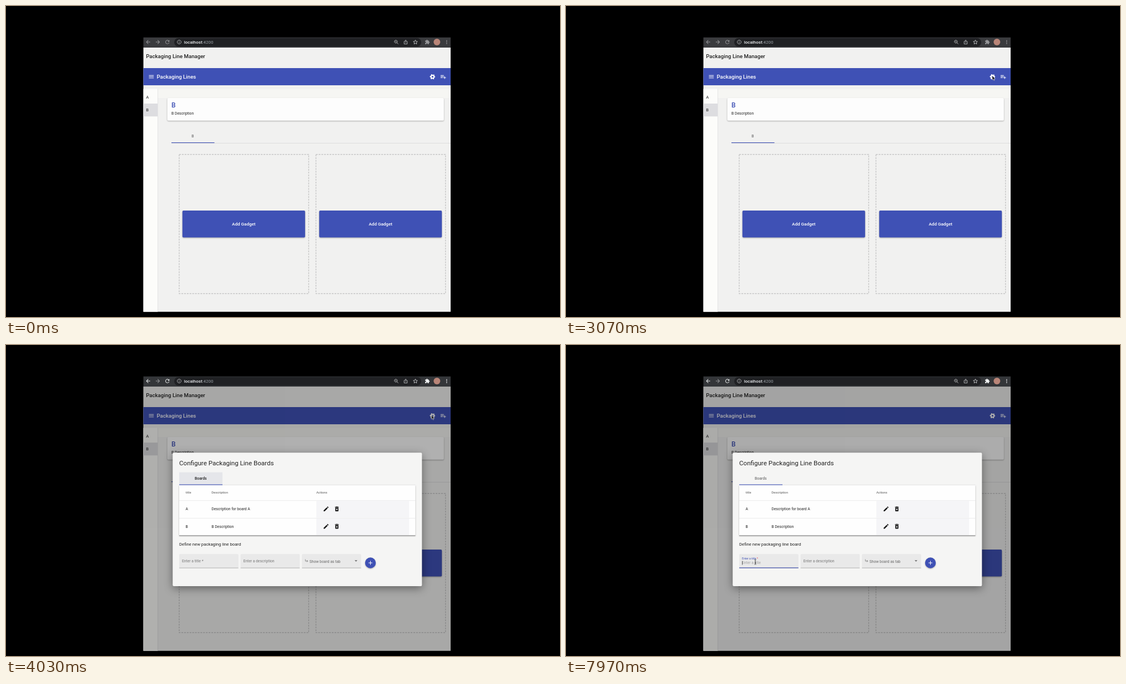
Write an HTML page that moves like this. It is 998 by 561 pixels and loops after 8000 ms.

```html
<!DOCTYPE html>
<html lang="en">
<head>
<meta charset="utf-8">
<title>Packaging Line Manager</title>
<style>
  html, body { margin: 0; width: 100%; height: 100%; overflow: hidden; background: #000; }
  svg { display: block; width: 100vw; height: 100vh; }
  text { font-family: Roboto, sans-serif; white-space: pre; }
  #dialog { transform-origin: 524.8px 314.5px; }
  #fieldLine { transform-origin: 365.5px 402px; }
  #ripple { transform-origin: 768px 127.7px; }
  .shadow { filter: drop-shadow(0 1px .8px rgba(0, 0, 0, .3)); }
  .deep { filter: drop-shadow(0 4px 8px rgba(0, 0, 0, .42)); }
</style>
</head>
<body>
<svg id="stage" viewBox="0 0 998 561" preserveAspectRatio="none"></svg>
<script>
const LOOP = 8000;
const BLUE = '#3f51b5', INK = '#222';

const rect = (x, y, w, h, fill, extra = '') =>
  `<rect x="${x}" y="${y}" width="${w}" height="${h}" fill="${fill}" ${extra}/>`;
const text = (str, x, y, size, fill = INK, weight = 400, extra = '') =>
  `<text x="${x}" y="${y}" font-size="${size}" fill="${fill}" font-weight="${weight}" ${extra}>${str}</text>`;
const at = (cx, cy, size, body, extra = '') =>
  `<g transform="translate(${cx} ${cy}) scale(${size / 24}) translate(-12 -12)" ${extra}>${body}</g>`;
const icon = (name, cx, cy, size, fill, extra = '') =>
  at(cx, cy, size, `<path fill-rule="evenodd" d="${PATHS[name]}"/>`, `fill="${fill}" ${extra}`);
const outline = (d, cx, cy, size, stroke) =>
  at(cx, cy, size, `<path d="${d}"/>`, `fill="none" stroke="${stroke}" stroke-width="2.2"`);

const PATHS = {
  back: 'M20 11H7.8l5.6-5.6L12 4l-8 8 8 8 1.4-1.4L7.8 13H20z',
  forward: 'M4 11h12.2l-5.6-5.6L12 4l8 8-8 8-1.4-1.4 5.6-5.6H4z',
  reload: 'M17.65 6.35A8 8 0 1 0 19.73 14h-2.08A6 6 0 1 1 12 6c1.66 0 3.14.69 4.22 1.78L13 11h7V4z',
  puzzle: 'M20.5 11H19V7c0-1.1-.9-2-2-2h-4V3.5a2.5 2.5 0 0 0-5 0V5H4c-1.1 0-2 .9-2 2v3.8h1.5a2.7 2.7 0 0 1 0 5.4H2V20c0 1.1.9 2 2 2h3.8v-1.5a2.7 2.7 0 0 1 5.4 0V22H17c1.1 0 2-.9 2-2v-4h1.5a2.5 2.5 0 0 0 0-5z',
  dots: 'M10 3h4v4h-4zM10 10h4v4h-4zM10 17h4v4h-4z',
  menu: 'M3 18h18v-2H3zM3 13h18v-2H3zM3 6v2h18V6z',
  addList: 'M14 10H2v2h12zM14 6H2v2h12zM18 14v-4h-2v4h-4v2h4v4h2v-4h4v-2zM2 16h8v-2H2z',
  edit: 'M3 17.25V21h3.75L17.81 9.94l-3.75-3.75zM20.71 7.04a1 1 0 0 0 0-1.41l-2.34-2.34a1 1 0 0 0-1.41 0l-1.83 1.83 3.75 3.75z',
  trash: 'M6 19c0 1.1.9 2 2 2h8c1.1 0 2-.9 2-2V7H6zM8.46 11.88l1.41-1.41L12 12.59l2.12-2.12 1.41 1.41L13.41 14l2.12 2.12-1.41 1.41L12 15.41l-2.12 2.12-1.41-1.41L10.59 14zM15.5 4l-1-1h-5l-1 1H5v2h14V4z',
  plus: 'M19 13h-6v6h-2v-6H5v-2h6V5h2v6h6z'
};

const browserBar = () => `
  ${rect(247.5, 56.7, 553.5, 18.5, '#3a3b3e', 'id="bar"')}
  ${rect(303, 57.8, 445, 15.4, '#202124', 'rx="7.7"')}
  <g id="navIcons" fill="#97989b">
    ${['back', 'reload', 'puzzle', 'dots'].map((name, i) =>
      icon(name, [256, 290.7, 759, 793.8][i], 65, [11, 11, 9.5, 9][i], 'inherit')).join('')}
  </g>
  ${icon('forward', 273.5, 65, 11, '#97989b')}
  ${outline('M12 2a10 10 0 1 0 .01 0M12 10.5v7M12 6v2.4', 312, 65, 8.4, '#c9cacd')}
  ${text('localhost<tspan fill="#9aa0a6" font-weight="400">:4200</tspan>', 320.7, 67.8, 8, '#e8eaed', 500)}
  ${outline('M10 3a7 7 0 1 0 .01 0M15 15l7 7M7 10h6', 703, 65, 8.8, '#d5d6d8')}
  ${outline('M8 9H4v13h16V9h-4M12 16V2M7.5 6.5L12 2l4.5 4.5', 720, 65, 8.4, '#d5d6d8')}
  ${outline('M12 2.5l2.9 6.5 7 .7-5.300 4.700 1.600 7L12 17.700 5.800 21.400l1.600-7L2.100 9.700l7-.7z', 737.5, 65, 9.200, '#d5d6d8')}
  <circle cx="776.3" cy="65" r="6" fill="#b98578"/>`;

const gear = () => at(768.3, 127.7, 11.6, `
  <circle cx="12" cy="12" r="5.4" stroke-width="4.200"/>
  <circle cx="12" cy="12" r="8.200" stroke-width="3.400" stroke-dasharray="4.400 4.187"
    transform="rotate(-15 12 12)"/>`, 'fill="none" stroke="#fff"');

const gadget = x => `
  ${rect(x, 267.7, 233.3, 251, 'none', 'stroke="#c6c6c6" stroke-width="1.4" stroke-dasharray="3.100 1.800"')}
  ${rect(x + 5.8, 369, 221, 48.4, BLUE, 'rx="2" class="shadow"')}
  ${text('Add Gadget', x + 116.3, 395.8, 8.05, '#fff', 500, 'text-anchor="middle"')}`;

const page = () => `
  ${rect(247.5, 75, 553.5, 476.6, '#f1f1f0')}
  ${text('Packaging Line Manager', 252.2, 93.5, 9.65, INK, 500)}
  ${rect(247.5, 112, 553.5, 31, BLUE)}
  ${icon('menu', 261.8, 127.7, 11.6, '#fff')}
  ${text('Packaging Lines', 271.400, 130.9, 9.65, '#fff', 500)}
  <circle id="ripple" cx="768" cy="127.700" r="9.500" fill="#fff" opacity="0"/>
  ${gear()}
  ${icon('addList', 787.7, 127.7, 11.6, '#fff')}
  ${rect(273, 150, 528, 16, '#f6f6f3')}
  ${rect(247.5, 149.5, 25.5, 402.1, '#fcfcfa')}
  ${rect(273, 149.5, .6, 402.1, '#dcdcdc')}
  ${rect(247.5, 176, 25.5, 23.2, '#dddde0')}
  ${text('A', 252.2, 166.7, 7.72)}
  ${text('B', 252.2, 189.9, 7.72)}
  ${rect(290.6, 166, 498.2, 40.700, '#fdfdfd', 'rx="2" class="shadow"')}
  ${text('B', 298, 182.5, 12, BLUE, 500)}
  ${text('B Description', 298.1, 195.9, 6.76)}
  ${text('B', 336.3, 237.3, 6.76, '#777', 500, 'text-anchor="middle"')}
  ${rect(298, 247, 503, .7, '#d4d4d4')}
  ${rect(298, 246, 77.5, 1.1, BLUE)}
  ${gadget(312)}
  ${gadget(558.4)}`;

const tableRow = (title, about, y) => `
  ${rect(312, y - 15.2, 425.5, .6, '#dfdfdf')}
  ${rect(559, y - 14.500, 167, 30.500, '#f5f5f7')}
  ${text(title, 323.6, y + 2.3, 6.76)}
  ${text(about, 370.3, y + 2.3, 6.76)}
  ${icon('edit', 576.6, y, 11.6, '#161616')}
  ${icon('trash', 596, y, 11.6, '#161616')}`;

const field = x => rect(x, 377, 106.7, 25.2, '#e9e9e9', 'rx="2"') + rect(x, 401.8, 106.7, .6, '#8a8a8a');

const dialog = () => `<g id="dialog" opacity="0">
  ${rect(300.3, 194.2, 449, 240.8, '#f5f5f4', 'rx="2" class="deep"')}
  ${text('Configure Packaging Line Boards', 312, 217.4, 11.58)}
  ${rect(312, 229.6, 78, 23, '#e5e6ea', 'id="tabFocus" opacity="0"')}
  ${text('Boards', 350.8, 242.7, 6.76, '#777', 500, 'id="tabName" text-anchor="middle"')}
  ${rect(312, 252.900, 425.5, 90.6, '#fefefe', 'class="shadow"')}
  ${rect(312, 252.200, 425.5, .6, '#dcdcdc')}
  ${rect(312, 251.5, 78, 1.1, BLUE)}
  ${['title', 'Description', 'Actions'].map((name, i) =>
    text(name, [323.6, 370.3, 559][i], 268.200, 5.79, '#757575', 500)).join('')}
  ${tableRow('A', 'Description for board A', 295.7)}
  ${tableRow('B', 'B Description', 327.2)}
  ${rect(312, 343.2, 425.5, 1.3, '#9b9b9b')}
  ${text('Define new packaging line board', 312, 362.2, 7.74)}
  ${[312, 422.5, 533].map(field).join('')}
  ${rect(312, 401.4, 106.7, 1.1, BLUE, 'id="fieldLine"')}
  <g id="label">${text('Enter a title <tspan id="star">*</tspan>', 0, 0, 6.76, 'inherit')}</g>
  <g id="hint" opacity="0">${text('Enter a title', 317, 395.4, 6.76, '#a2a2a2')}</g>
  ${rect(317.4, 389.6, .7, 7, '#222', 'id="caret" opacity="0"')}
  ${text('Enter a description', 427.4, 392, 6.76, '#777')}
  <path d="M539.300 386.500v3.300h4.400m-1.700-1.700l1.700 1.700-1.700 1.700" fill="none" stroke="#666" stroke-width=".7"/>
  ${text('Show board as tab', 546.8, 392.6, 6.76, '#666')}
  <path d="M628 388.200h5l-2.500 2.600z" fill="#666"/>
  <circle cx="656.5" cy="393" r="9.700" fill="${BLUE}" class="shadow"/>
  ${icon('plus', 656.5, 393, 11.6, '#fff')}
</g>`;

const pointers = () => `<g id="pointer" opacity="0">
  <path id="arrow" d="M0 0v7.200l1.700-1.500 1.200 2.700 1.200-.5-1.200-2.600h2.300z" fill="#000" stroke="#fff" stroke-width=".6"/>
  <path id="beam" opacity="0" d="M-1.600-4.300Q0-4.300 0-3.300Q0-4.300 1.600-4.300M0-3.300V3.300M-1.600 4.300Q0 4.300 0 3.300Q0 4.300 1.600 4.300M-.9 1.200h1.800"
    fill="none" stroke="#222" stroke-width=".8"/>
</g>`;

document.getElementById('stage').innerHTML =
  browserBar() + page() +
  rect(247.5, 75, 553.5, 476.6, '#000', 'id="scrim" opacity="0"') +
  dialog() + pointers();

const SWIFT = 'cubic-bezier(.25, .8, .25, 1)';
const DECEL = 'cubic-bezier(0, 0, .2, 1)';
const HOLD = 'step-end';
const GLIDE = 'ease-in-out';
const PRESS = 3700, OPEN = 3813, FOCUS = 6555;
const started = document.timeline.currentTime || 0;

// Each step is [ms, value, easing towards the next step].
function play(id, property, steps) {
  const last = steps[steps.length - 1];
  const frames = [...steps, [LOOP, last[1]]].map(([ms, value, easing = HOLD]) =>
    ({ offset: ms / LOOP, [property]: value, easing }));
  const run = document.getElementById(id).animate(frames, { duration: LOOP, iterations: Infinity });
  run.startTime = started;
}
const move = (x, y, scale = 1) => `translate(${x}px, ${y}px) scale(${scale})`;

play('bar', 'fill', [[0, '#3a3b3e'], [PRESS, '#343639']]);
play('navIcons', 'fill', [[0, '#97989b'], [PRESS, '#f1f3f4']]);

play('ripple', 'transform', [[0, 'scale(0)'], [PRESS, 'scale(0)', DECEL], [PRESS + 120, 'scale(1)']]);
play('ripple', 'opacity', [[0, 0], [PRESS, .2], [3850, .2, 'linear'], [4010, 0]]);

play('scrim', 'opacity', [[0, 0], [OPEN, 0, SWIFT], [OPEN + 400, .32]]);
play('dialog', 'opacity', [[0, 0], [OPEN, 0, DECEL], [OPEN + 150, 1]]);
play('dialog', 'transform', [[0, 'scale(.7)'], [OPEN, 'scale(.7)', DECEL], [OPEN + 150, 'scale(1)']]);

play('tabFocus', 'opacity', [[0, 0], [OPEN + 150, 1], [FOCUS - 20, 0]]);
play('tabName', 'fill', [[0, '#777'], [OPEN + 150, '#222'], [FOCUS - 20, '#777']]);

play('fieldLine', 'transform', [[0, 'scaleX(0)'], [FOCUS - 20, 'scaleX(1)']]);
play('label', 'transform', [[0, move(317, 392)], [FOCUS, move(317, 392), SWIFT], [FOCUS + 400, move(317, 386.5, .75)]]);
play('label', 'fill', [[0, '#777'], [FOCUS, '#777', SWIFT], [FOCUS + 400, BLUE]]);
play('star', 'fill', [[0, '#777'], [FOCUS, '#f0384a']]);
play('hint', 'opacity', [[0, 0], [FOCUS, 1]]);
play('caret', 'opacity', [[0, 0], [FOCUS, 1], [FOCUS + 500, 0], [FOCUS + 1000, 1]]);

play('pointer', 'opacity', [[0, 0], [1350, 1]]);
play('arrow', 'opacity', [[0, 1], [5960, 0]]);
play('beam', 'opacity', [[0, 0], [5960, 1]]);
play('pointer', 'transform', [
  [0, move(795, 300)],
  [1350, move(795, 300), 'ease-out'],
  [1700, move(735.6, 236)],
  [2100, move(735.6, 236), GLIDE],
  [3000, move(768, 126)],
  [3900, move(768, 126), 'linear'],
  [4030, move(766.5, 126.5)],
  [4250, move(766.5, 126.5), GLIDE],
  [5000, move(495.7, 277)],
  [5350, move(495.7, 277), GLIDE],
  [6150, move(334, 392)],
  [6700, move(334, 392), GLIDE],
  [7250, move(341, 391.4)]
]);
</script>
</body>
</html>
```
